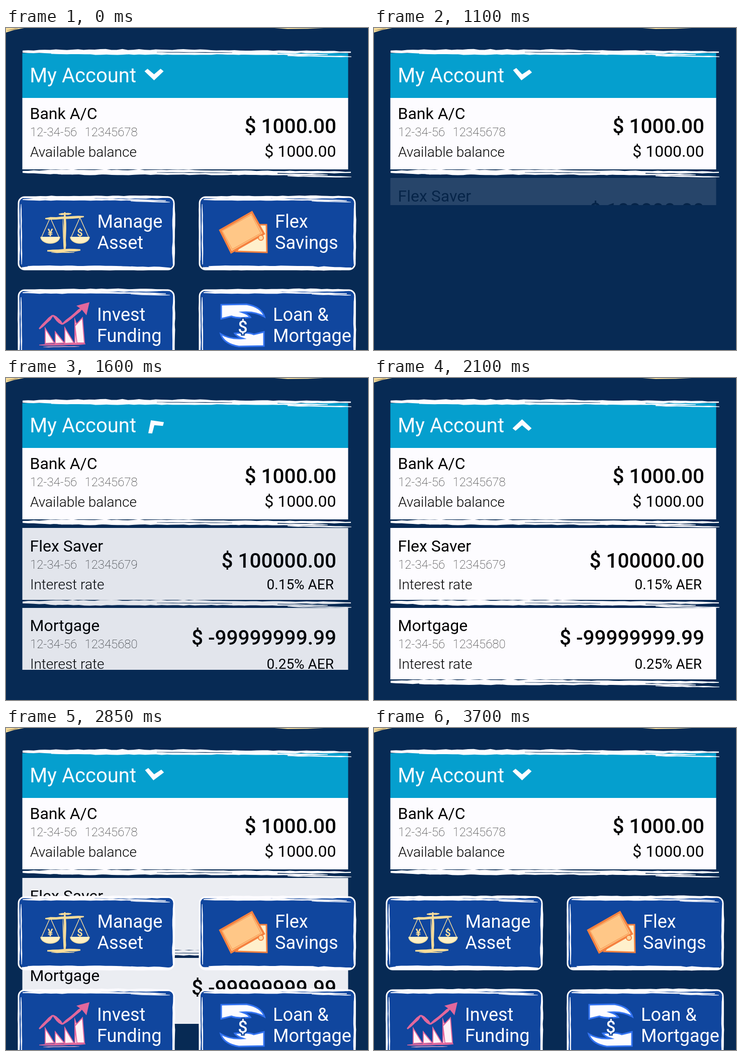
An HTML page with a canvas that plays this animation: 720 by 640 pixels, repeating every 3750 ms.

```html
<!DOCTYPE html>
<html lang="en">
<head>
<meta charset="utf-8">
<title>My Account</title>
<style>
html, body { margin: 0; width: 720px; height: 640px; overflow: hidden; background: #072a54; }
canvas { display: block; }
</style>
</head>
<body>
<canvas id="stage" width="720" height="640"></canvas>
<script>
const W = 720, H = 640, LOOP = 3750, STEP = 50;
const NAVY = '#072a54', BLUE = '#10469e', CYAN = '#059fce', GOLD = '#f8dd9a', WHITE = '#fdfcff';
const LIST_TOP = 298, LIST_HEIGHT = 317;

let seed = 7;
const random = () => (seed = (seed * 16807) % 2147483647) / 2147483647;
const clamp = v => Math.max(0, Math.min(1, v));
const progress = (t, from, to) => clamp((t - from) / (to - from));
const easeInOut = u => u * u * (3 - 2 * u);

function layer(paint) {
  const canvas = document.createElement('canvas');
  canvas.width = W;
  canvas.height = H;
  paint(canvas.getContext('2d'));
  return canvas;
}

function text(g, string, x, y, size, weight = 400, color = '#000', align = 'left') {
  g.font = `${weight} ${size}px Roboto, sans-serif`;
  g.fillStyle = color;
  g.textAlign = align;
  g.fillText(string, x, y);
}

function shape(g, points, fill, line, width = 2) {
  g.beginPath();
  points.forEach(([x, y]) => g.lineTo(x, y));
  g.closePath();
  if (fill) { g.fillStyle = fill; g.fill(); }
  if (line) { g.strokeStyle = line; g.lineWidth = width; g.stroke(); }
}

// A dry brush stroke: a ribbon with ragged sides and thin ends.
function brush(g, x0, y0, x1, y1, width, color = WHITE) {
  const length = Math.hypot(x1 - x0, y1 - y0);
  const nx = -(y1 - y0) / length, ny = (x1 - x0) / length;
  const count = Math.max(4, Math.round(length / 11));
  const left = [], right = [];
  for (let i = 0; i <= count; i++) {
    const u = i / count;
    const body = width / 2 * Math.min(1, 0.45 + 4 * u * (1 - u));
    const x = x0 + (x1 - x0) * u, y = y0 + (y1 - y0) * u;
    const a = body * (0.7 + 0.5 * random()), b = body * (0.7 + 0.5 * random());
    left.push([x + nx * a, y + ny * a]);
    right.unshift([x - nx * b, y - ny * b]);
  }
  shape(g, left.concat(right), color);
}

function tornEdge(g, y) {
  brush(g, 33, y + 5, 430, y + 5, 9);
  brush(g, 90, y + 8, 540, y + 8, 6);
  brush(g, 300, y + 4, 686, y + 6, 5);
  brush(g, 420, y + 9, 640, y + 11, 3);
  brush(g, 560, y + 13, 687, y + 15, 2.5);
  brush(g, 300, y + 6, 450, y + 7, 1, NAVY);
}

function account(g, y, row) {
  g.fillStyle = WHITE;
  g.fillRect(32.5, y, 648, row.bottom - y);
  text(g, row.name, 47.5, row.base, 32);
  text(g, '12-34-56', 48, row.base + 34, 24, 100, '#222');
  text(g, row.number, 156.5, row.base + 34, 24, 100, '#222');
  text(g, row.label, 48, row.base + 75, 28, 300);
  text(g, row.amount, 657, row.amountBase, 40.5, 500, '#000', 'right');
  text(g, row.detail, row.detailRight, row.base + 75, row.detailSize, 400, '#000', 'right');
  tornEdge(g, row.bottom);
}

const base = layer(g => {
  g.fillStyle = NAVY;
  g.fillRect(0, 0, W, H);
  shape(g, [[0, 0], [36, 0], [16, 4], [0, 9]], GOLD);
  brush(g, 2, 5, 24, 1, 1.2, '#8a7a58');
  shape(g, [[534, 0], [632, 0], [600, 1.5], [560, 2]], GOLD);

  g.fillStyle = CYAN;
  g.fillRect(32.5, 50, 648, 90);
  text(g, 'My Account', 47.2, 108, 40, 400, WHITE);
  account(g, 139, {
    bottom: 281, name: 'Bank A/C', base: 181, number: '12345678', label: 'Available balance',
    amount: '$ 1000.00', amountBase: 209, detail: '$ 1000.00', detailSize: 32, detailRight: 656.5
  });
  tornEdge(g, 42);
});

const list = layer(g => {
  account(g, 298, {
    bottom: 441, name: 'Flex Saver', base: 345, number: '12345679', label: 'Interest rate',
    amount: '$ 100000.00', amountBase: 377, detail: '0.15% AER', detailSize: 28, detailRight: 652
  });
  account(g, 457, {
    bottom: 599, name: 'Mortgage', base: 503, number: '12345680', label: 'Interest rate',
    amount: '$ -99999999.99', amountBase: 530, detail: '0.25% AER', detailSize: 28, detailRight: 652
  });
});

function button(g, x, y, lines, textX, icon) {
  g.save();
  g.translate(x, y);
  g.fillStyle = BLUE;
  g.beginPath();
  g.roundRect(4, 6, 306, 138, 9);
  g.fill();
  g.strokeStyle = WHITE;
  g.lineWidth = 3;
  g.beginPath();
  g.roundRect(2, 4, 309, 144, 12);
  g.stroke();
  brush(g, 7, 18, 8, 138, 2.5);
  brush(g, 2, 18, 3, 130, 3.5);
  brush(g, 311, 16, 310, 138, 5);
  brush(g, 8, 145, 304, 146, 8);
  brush(g, 20, 142, 230, 143, 4);
  brush(g, 12, 5, 300, 4, 6);
  brush(g, 10, 9, 190, 9, 4);
  brush(g, 60, 7, 295, 11, 3);
  brush(g, 225, 12, 303, 14, 2);
  g.restore();
  icon(g);
  lines.forEach((line, i) => text(g, line, textX, y + 65 + 42 * i, 36, 400, WHITE));
}

function scales(g) {
  brush(g, 117, 366, 117, 443, 5, GOLD);
  brush(g, 113, 380, 115, 440, 1.5, GOLD);
  brush(g, 78, 379, 155, 375, 5, GOLD);
  brush(g, 105, 370, 130, 369, 4, GOLD);
  brush(g, 82, 443, 148, 441, 6, GOLD);
  brush(g, 90, 446, 136, 446, 2, GOLD);
  for (const [x, sign] of [[88, '¥'], [147, '$']]) {
    g.strokeStyle = GOLD;
    g.lineWidth = 1.4;
    g.beginPath();
    g.moveTo(x - 17, 415);
    g.lineTo(x, 377);
    g.lineTo(x + 17, 415);
    g.stroke();
    g.beginPath();
    g.ellipse(x, 415, 19, 13, 0, 0, Math.PI);
    g.fillStyle = '#fff0c4';
    g.fill();
    g.stroke();
    text(g, sign, x, 414, 20, 700, GOLD, 'center');
  }
}

function cards(g) {
  const orange = '#f5813f';
  shape(g, [[498, 391], [518, 391], [519, 446], [458, 444]], '#fff0cc', orange, 3);
  shape(g, [[426, 402], [489, 366], [513, 409], [448, 446]], '#ffc787', orange, 4);
  shape(g, [[430, 403], [488, 371], [507, 408], [450, 440]], null, '#f9a45e', 1.5);
  g.beginPath();
  g.arc(507, 417, 5, 0, 7);
  g.fillStyle = '#ffd9a0';
  g.fill();
  g.strokeStyle = orange;
  g.lineWidth = 2;
  g.stroke();
}

function chart(g) {
  const pink = '#e2689c';
  for (const [x, top] of [[78, 597], [98, 604], [117, 596], [137, 580]]) {
    shape(g, [[x, top], [x + 18, 626], [x, 627]], '#fff3f8', pink, 2);
  }
  shape(g, [[137, 592], [152, 576], [156, 626], [141, 626]], '#fff3f8', pink, 2);
  const path = [[66, 598], [93, 571], [112, 589], [154, 555]];
  for (let i = 1; i < path.length; i++) brush(g, ...path[i - 1], ...path[i], 6, pink);
  shape(g, [[140, 552], [166, 545], [160, 571], [151, 560]], pink);
  brush(g, 66, 630, 158, 628, 3, pink);
  brush(g, 74, 634, 146, 633, 1.5, '#f4a6c4');
}

function hands(g) {
  const hand = () => {
    g.beginPath();
    g.moveTo(428, 550);
    g.lineTo(478, 549);
    g.quadraticCurveTo(508, 554, 514, 574);
    g.quadraticCurveTo(496, 563, 470, 565);
    g.quadraticCurveTo(482, 569, 486, 575);
    g.quadraticCurveTo(460, 578, 448, 573);
    g.lineTo(428, 578);
    g.closePath();
    g.fillStyle = WHITE;
    g.fill();
    g.strokeStyle = '#3474f2';
    g.lineWidth = 3;
    g.stroke();
  };
  hand();
  g.save();
  g.translate(941, 1182);
  g.rotate(Math.PI);
  hand();
  g.restore();
  g.strokeStyle = BLUE;
  g.lineWidth = 5;
  g.font = '500 34px Roboto, sans-serif';
  g.textAlign = 'center';
  g.strokeText('$', 471, 606);
  text(g, '$', 471, 606, 34, 500, WHITE, 'center');
}

const buttons = layer(g => {
  button(g, 23, 332, ['Manage', 'Asset'], 181.5, scales);
  button(g, 383, 332, ['Flex', 'Savings'], 535, cards);
  button(g, 23, 517, ['Invest', 'Funding'], 181, chart);
  button(g, 383, 517, ['Loan &', 'Mortgage'], 531, hands);
});

const stage = document.getElementById('stage').getContext('2d');

function drawList(height, alpha) {
  if (height <= 0 || alpha <= 0) return;
  stage.save();
  stage.globalAlpha = alpha;
  stage.beginPath();
  stage.rect(0, LIST_TOP, W, Math.round(LIST_HEIGHT * height));
  stage.clip();
  stage.drawImage(list, 0, 0);
  stage.restore();
}

function drawChevron(angle) {
  stage.save();
  stage.translate(294.5, 93);
  stage.rotate(angle);
  shape(stage, [[-19, -7], [-13, -12], [0, -1], [13, -12], [19, -7], [0, 11]], WHITE);
  stage.restore();
}

function drawTouch(x, y, alpha) {
  if (alpha <= 0) return;
  stage.fillStyle = '#bfe4ff';
  for (const [radius, strength] of [[24, 0.1], [21, 0.28]]) {
    stage.globalAlpha = alpha * strength;
    stage.beginPath();
    stage.arc(x, y, radius, 0, Math.PI * 2);
    stage.fill();
  }
  stage.globalAlpha = 1;
}

function touchMove(t, start, end, from, to) {
  const u = easeInOut(progress(t, start, end));
  return [from[0] + (to[0] - from[0]) * u, from[1] + (to[1] - from[1]) * u];
}

function render(t) {
  const opening = progress(t, 1075, 1727);
  const closing = progress(t, 2825, 3475);
  const closePhase = t >= 2300;

  stage.drawImage(base, 0, 0);
  if (closePhase) drawList((1 - closing) ** 2.3, (1 - closing) ** 1.9);
  else drawList(opening ** 0.54, progress(t, 1015, 1672));
  if (t < 1050 || closePhase) stage.drawImage(buttons, 0, 0);

  if (t >= 50 && t < 1050) {
    drawTouch(...touchMove(t, 0, 600, [742, 514], [298, 95]), 1 - progress(t, 900, 1050));
  } else if (closePhase && t < 2850) {
    const alpha = progress(t, 2250, 2400) * (1 - progress(t, 2700, 2850));
    drawTouch(...touchMove(t, 2250, 2630, [400, 299], [298, 95]), alpha);
  }

  const spin = closePhase ? (t < 3550 ? closing : 0) : opening;
  drawChevron(spin * Math.PI);
}

function tick() {
  const t = performance.now() % LOOP;
  render(Math.floor(t / STEP) * STEP);
  requestAnimationFrame(tick);
}
tick();
</script>
</body>
</html>
```
